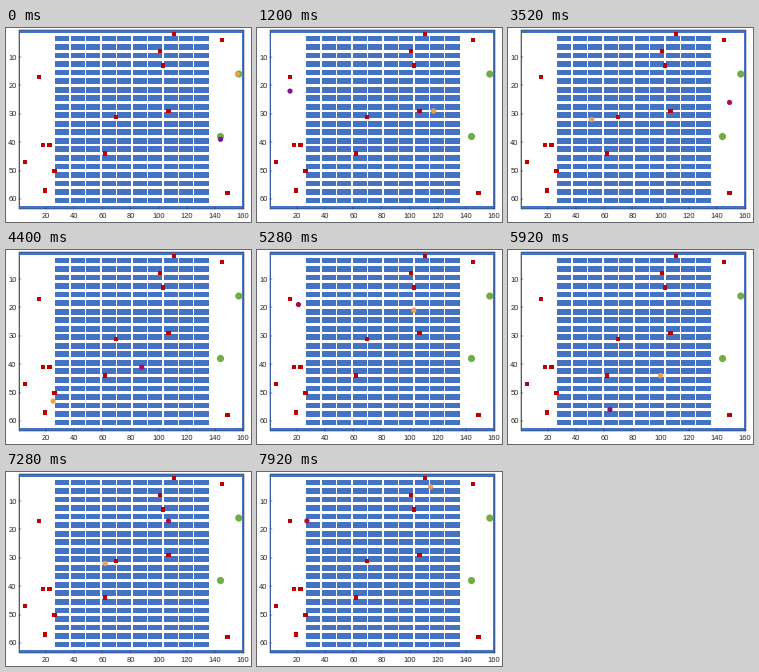
A matplotlib script that plays this animation: 245x194 px, repeating every 8000 ms.

```python
import matplotlib.pyplot as plt
import numpy as np
from matplotlib.animation import FuncAnimation
from matplotlib.patches import Circle, Rectangle

W, H, DPI = 245, 194, 100
FRAMES, INTERVAL, CELLS_PER_FRAME = 100, 80, 10
CELL_W, CELL_H = 1.407, 2.84
COLS, ROWS = 160, 63
BLUE, RED, GREEN, ORANGE = "#4472c4", "#c00000", "#70ad47", "#f0a04b"

fig = plt.figure(figsize=(W / DPI, H / DPI), dpi=DPI, facecolor="white")
ax = fig.add_axes([0, 0, 1, 1])
ax.set_xlim(0, W)
ax.set_ylim(H, 0)
ax.axis("off")


def px(col, row):
    return 11.9 + CELL_W * col, 0.6 + CELL_H * row


def block(col, row, cols, rows):
    """Fill a range of cells, starting at a 1-based cell."""
    ax.add_patch(Rectangle(px(col - 0.5, row - 0.5), cols * CELL_W,
                           rows * CELL_H, fc=BLUE, lw=0))


def dot(cell, radius, color, z):
    return ax.add_patch(Circle(px(*cell), radius, fc=color, lw=0, zorder=z))


# Walls and shelves
block(1, 1, COLS, 1)
block(1, ROWS, COLS, 1)
block(1, 1, 1, ROWS)
block(COLS, 1, 1, ROWS)
for col in range(27, 136, 11):
    for row in range(3, 62, 3):
        block(col, row, 10, 2)

# Frame, ticks and labels
left, top = px(0.5, 0.5)
right, bottom = px(COLS + 0.5, ROWS + 0.5)
ax.add_patch(Rectangle((left, top), right - left, bottom - top, fill=False,
                       ec="#262626", lw=0.35, zorder=2))
text = dict(fontname="Liberation Sans", fontsize=5.4, color="#262626")
for col in range(20, 161, 20):
    x, _ = px(col, 0)
    ax.plot([x, x], [bottom, bottom - 2], color="#262626", lw=0.35)
    ax.text(x, 188, str(col), ha="center", va="center_baseline", **text)
for row in range(10, 61, 10):
    _, y = px(0, row)
    ax.plot([left, left + 2], [y, y], color="#262626", lw=0.35)
    ax.text(10.5, y, str(row), ha="right", va="center_baseline", **text)

# Items and depots
ITEMS = [(111, 2), (145, 4), (101, 8), (103, 13), (15, 17), (107, 29),
         (70, 31), (18, 41), (22, 41), (23, 41), (62, 44), (5, 47),
         (26, 50), (19, 57), (149, 58)]
SIDE = 4.2
for item in ITEMS:
    x, y = px(*item)
    ax.add_patch(Rectangle((x - SIDE / 2, y - SIDE / 2), SIDE, SIDE,
                           fc=RED, lw=0, zorder=4))
for depot in [(157, 16), (144, 38)]:
    dot(depot, 3.6, GREEN, 3)


def route(start, *legs):
    """Way points as (step, col, row). 'x' and 'y' legs run one cell per step;
    't' legs reach the given step, moving evenly or waiting."""
    step, col, row = 0, *start
    points = [(step, col, row)]
    for kind, *value in legs:
        if kind == "x":
            step, col = step + abs(value[0] - col), value[0]
        elif kind == "y":
            step, row = step + abs(value[0] - row), value[0]
        else:
            step = value[0]
            col, row = value[1:] or (col, row)
        points.append((step, col, row))
    return np.array(points, float)


ORANGE_ROUTE = route(
    (156, 16), ("y", 4), ("x", 145), ("t", 27), ("x", 149), ("y", 58),
    ("t", 89), ("x", 140), ("y", 29), ("x", 114), ("y", 2), ("x", 111),
    ("x", 81), ("y", 41), ("x", 18), ("t", 325), ("x", 19), ("y", 57),
    ("y", 32), ("x", 70), ("y", 31), ("y", 32), ("t", 440, 51, 32),
    ("x", 6), ("y", 47), ("x", 5), ("x", 19), ("y", 57), ("t", 540),
    ("x", 25), ("y", 53), ("x", 26), ("y", 44), ("x", 103), ("y", 2),
    ("x", 111), ("x", 103), ("y", 44), ("x", 21), ("y", 47), ("x", 5),
    ("x", 6), ("y", 32), ("x", 114), ("y", 5), ("x", 115))

PURPLE_ROUTE = route(
    (144, 39), ("y", 41), ("x", 15), ("y", 17), ("x", 26), ("y", 41),
    ("x", 5), ("y", 47), ("t", 219), ("y", 46), ("t", 240, 5, 29),
    ("t", 290, 46, 29), ("x", 81), ("y", 8), ("x", 140), ("y", 4),
    ("x", 149), ("y", 58), ("y", 41), ("x", 15), ("y", 17), ("t", 652),
    ("x", 21), ("y", 56), ("x", 140), ("y", 58), ("x", 149), ("y", 56),
    ("x", 114), ("y", 17), ("x", 27))

# The purple robot's tint from each step on
TINTS = [(0, "#80148c"), (155, "#a01060"), (220, "#b8082c"),
         (414, "#b00a58"), (652, "#a00c50"), (700, "#8c1068"),
         (864, "#b00a48")]

orange = dot((156, 16), 2.6, ORANGE, 5)
purple = dot((144, 39), 2.6, TINTS[0][1], 5)


def place(robot, path, step):
    col = np.interp(step, path[:, 0], path[:, 1])
    row = np.interp(step, path[:, 0], path[:, 2])
    robot.center = px(np.round(col), np.round(row))


def update(frame):
    step = frame * CELLS_PER_FRAME
    place(orange, ORANGE_ROUTE, step)
    place(purple, PURPLE_ROUTE, step)
    purple.set_facecolor([tint for start, tint in TINTS if start <= step][-1])
    return orange, purple


anim = FuncAnimation(fig, update, frames=FRAMES, interval=INTERVAL,
                     repeat=True, repeat_delay=0)
plt.show()
```
